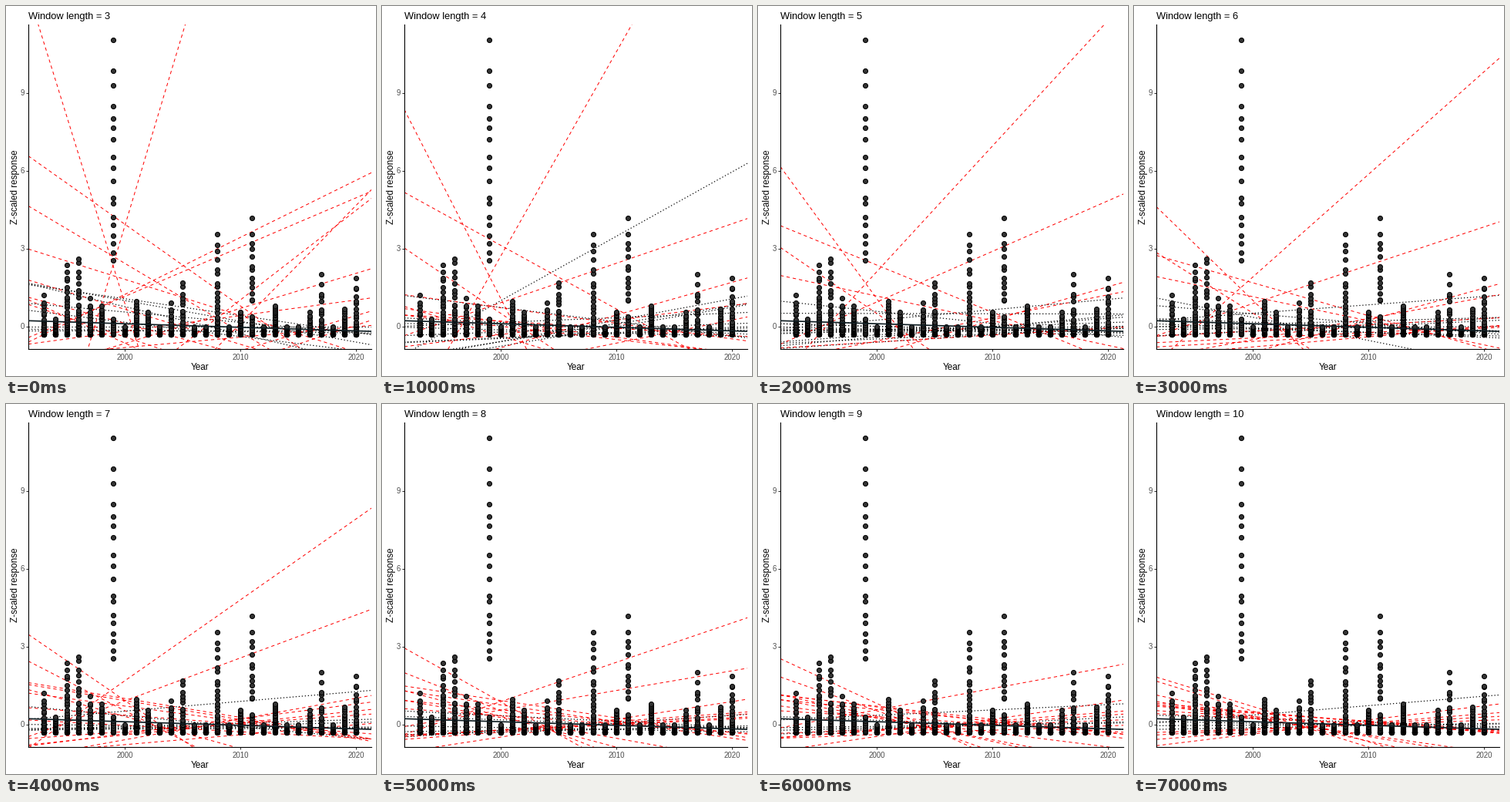
Write a matplotlib script that moves like this. It is 480 px wide and 480 px high and loops after 8000 ms.

```python
import numpy as np
import matplotlib.pyplot as plt
from matplotlib.animation import FuncAnimation
from matplotlib.collections import LineCollection

SIZE, DPI = 480, 100
PX = 72 / DPI  # one pixel in points
LEFT, RIGHT, TOP, BOTTOM = 29, 474.3, 24, 445
X0, X_STEP = 154.25, 15       # pixel of the year 2000, pixels per year
Y0, Y_STEP = 415.7, 33.67     # pixel of zero, pixels per unit
FLOOR = -.3                   # lowest response
PER_YEAR = 41
CUTOFF = 1.8                  # slope / error ratio that counts as significant

plt.rcParams["font.family"] = ["Liberation Sans", "DejaVu Sans"]
plt.rcParams["lines.scale_dashes"] = False

# Peak and mean response of the lively years; all others are quiet
QUIET = (-.02, -.24)
LIVELY = {
    1993: (1.2, -.08), 1994: (.3, -.17), 1995: (2.38, .3), 1996: (2.6, .27),
    1997: (1.1, -.1), 1998: (.78, -.03), 1999: (11.03, 2.87), 2001: (.97, 0),
    2002: (.55, -.12), 2004: (.9, -.13), 2005: (1.67, .03), 2008: (3.55, .45),
    2010: (.55, -.08), 2011: (4.17, .67), 2013: (.78, .04), 2016: (.55, -.16),
    2017: (2.02, .03), 2019: (.66, -.1), 2020: (1.85, .05),
}
years = np.arange(1993, 2021)
peaks, means = np.array([LIVELY.get(year, QUIET) for year in years]).T

# Responses follow FLOOR + height * u ** power, with u uniform in 0..1
heights = peaks - FLOOR
powers = heights / (means - FLOOR) - 1
variances = heights ** 2 * (1 / (2 * powers + 1) - 1 / (powers + 1) ** 2)

x_lim = (2000 + (LEFT - X0) / X_STEP, 2000 + (RIGHT - X0) / X_STEP)
y_lim = ((Y0 - BOTTOM) / Y_STEP, (Y0 - TOP) / Y_STEP)

fig = plt.figure(figsize=(SIZE / DPI, SIZE / DPI), dpi=DPI, facecolor="white")
ax = fig.add_axes([LEFT / SIZE, 1 - BOTTOM / SIZE,
                   (RIGHT - LEFT) / SIZE, (BOTTOM - TOP) / SIZE])
ax.set(xlim=x_lim, ylim=y_lim, xticks=[2000, 2010, 2020], yticks=[0, 3, 6, 9],
       xticklabels=[], yticklabels=[])
ax.tick_params(length=2.7 * PX, width=PX, color="#333333")
ax.spines[["top", "right"]].set_visible(False)
ax.spines[["left", "bottom"]].set_linewidth(1.1 * PX)


def label(x, y, text, size, **style):
    """Text with its baseline at a pixel position counted from the top left."""
    return fig.text(x / SIZE, 1 - y / SIZE, text, fontsize=size * PX,
                    **{"va": "baseline", **style})


for year in (2000, 2010, 2020):
    label(X0 + (year - 2000) * X_STEP, 459, str(year), 9.6,
          ha="center", color="#4d4d4d")
for value in (0, 3, 6, 9):
    label(24.3, Y0 - value * Y_STEP + 3.5, str(value), 9.6,
          ha="right", color="#4d4d4d")
label((LEFT + RIGHT) / 2, 472, "Year", 11.8, ha="center")
label(18.5, 235, "Z-scaled response", 11.8, ha="right", va="center", rotation=90)
title = label(LEFT, 17, "", 12.9)


def responses(peak, power, rng):
    u = (np.arange(PER_YEAR) + rng.random(PER_YEAR)) / PER_YEAR
    values = FLOOR + (peak - FLOOR) * (u / u.max()) ** power
    # Large outbursts stand clear of the quiet band
    return values[(values < .4) | (values > .22 * peak) | (peak < 4)]


rng = np.random.default_rng(4)
for year, peak, power in zip(years, peaks, powers):
    column = responses(peak, power, rng)
    ax.plot(np.full(len(column), year), column, "o", ms=6.1 * PX,
            mfc="#333333", mec="black", mew=PX, zorder=3)
ax.plot(x_lim, (.22, -.19), color="#0f1d22", lw=1.7 * PX, zorder=4)


def line_set(color, width, on, off):
    lines = LineCollection([], colors=color, linewidths=width * PX, zorder=2,
                           capstyle="butt",
                           linestyles=[(0, (on * PX, off * PX))])
    return ax.add_collection(lines, autolim=False)


flats = line_set("black", 1.2, 1.3, 2.7)
trends = line_set("red", 1, 4.3, 3.9)


def fit(start, length):
    """Regression line over one window and whether its slope is significant."""
    part = slice(start, start + length)
    x, y = years[part], means[part]
    dx = x - x.mean()
    sxx = (dx ** 2).sum()
    slope = (dx * y).sum() / sxx
    resid = y - y.mean() - slope * dx
    spread = PER_YEAR * (variances[part].sum() + (resid ** 2).sum())
    error = np.sqrt(spread / (PER_YEAR * length - 2) / (PER_YEAR * sxx))
    ends = [(e, y.mean() + slope * (e - x.mean())) for e in x_lim]
    return ends, abs(slope) / error > CUTOFF


def update(frame):
    length = frame + 3
    fits = [fit(i, length) for i in range(len(years) - length + 1)]
    trends.set_segments([ends for ends, strong in fits if strong])
    flats.set_segments([ends for ends, strong in fits if not strong])
    title.set_text(f"Window length = {length}")
    return trends, flats, title


anim = FuncAnimation(fig, update, frames=8, interval=1000, repeat=True,
                     repeat_delay=0, blit=False)
plt.show()
```
